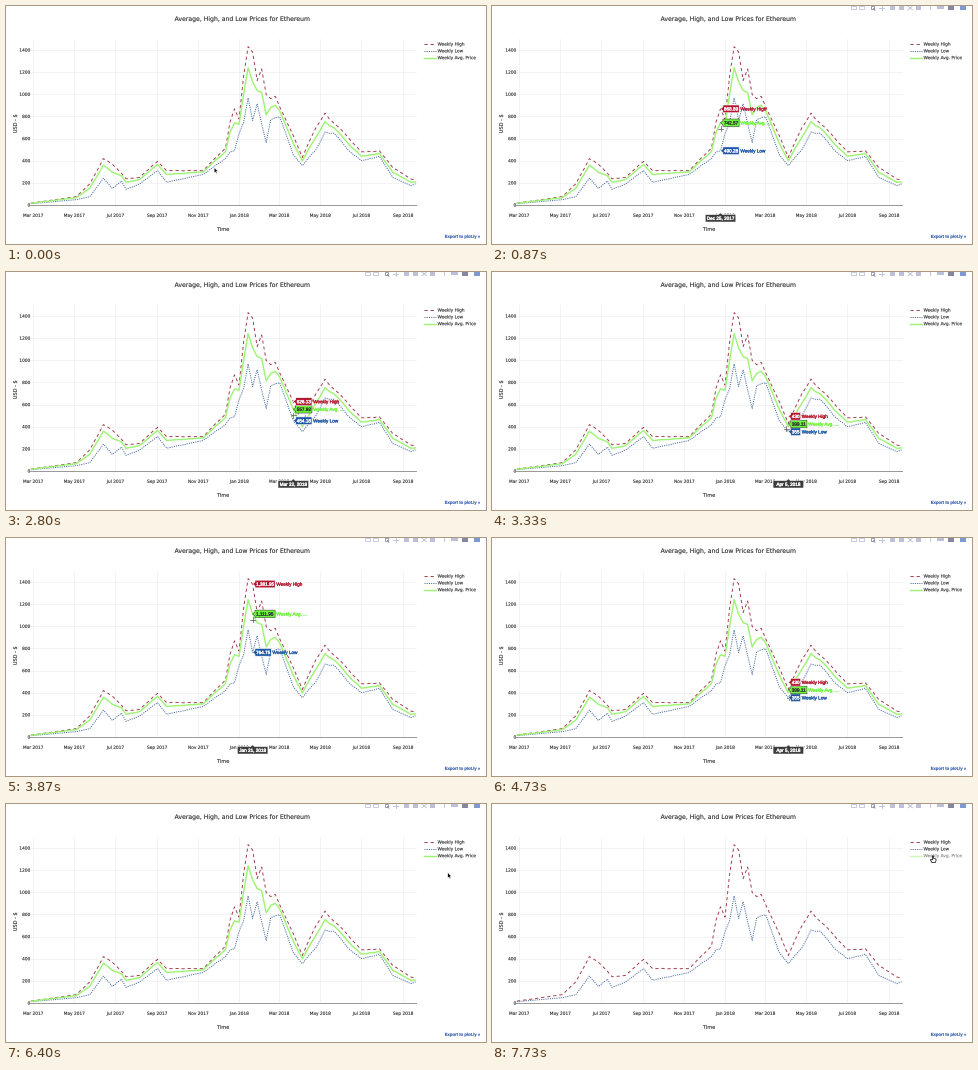
These frames come from a looping animation (480 by 238 pixels, 8 s). A matplotlib script:

```python
import numpy as np
import matplotlib.pyplot as plt
from matplotlib.animation import FuncAnimation
from matplotlib.patches import PathPatch, Polygon, Rectangle
from matplotlib.patheffects import withStroke
from matplotlib.textpath import TextPath
from matplotlib.transforms import Affine2D

plt.rcParams.update({"text.hinting": "none", "lines.scale_dashes": False})
W, H, DPI = 480, 238, 100
PX = 72 / DPI
LOOP, STEP = 8000, 50
RED, BLUE, LIME, INK = "#b5162f", "#1f57a4", "#6cf53a", "#2a2a2a"
RED_LINE, BLUE_LINE, LIME_LINE, GRID = "#a03a4c", "#44689f", "#9cf472", "#f1f1f1"
DASH, DOT = (3.2, 2.9), (1.1, 1.1)
SANS, HOVER_FONT, HOVER_SIZE = "DejaVu Sans", "Liberation Sans", 4.65
MONTHS = "Jan Feb Mar Apr May Jun Jul Aug Sep Oct Nov Dec".split()
START = np.datetime64("2017-03-01")

fig = plt.figure(figsize=(W / DPI, H / DPI), dpi=DPI, facecolor="white")
ax = fig.add_axes([0, 0, 1, 1])
ax.set(xlim=(0, W), ylim=(H, 0))
ax.axis("off")


def day_x(day):
    return 27 + 0.674 * day


def price_y(price):
    return 199 - 0.1107 * price


def ease(t, start, end):
    u = np.clip((t - start) / (end - start), 0, 1)
    return u * u * (3 - 2 * u)


def label(x, y, s, size=4.3, color=INK, align=0.5, turn=0, family=SANS, weight="normal"):
    """Fixed text as outlines; align 0 is left, 1 is right."""
    path = TextPath((0, 0), s, size=size, prop={"family": family, "weight": weight})
    shift = -align * path.get_extents().x1
    move = Affine2D().translate(shift, -0.36 * size).scale(1, -1).rotate_deg(turn)
    return ax.add_patch(PathPatch(path, fc=color, ec=color, lw=0.12 * PX,
                                  transform=move.translate(x, y) + ax.transData))


def line(x, y, color, width, dash=None, **kw):
    style = (0, [d * PX for d in dash]) if dash else "-"
    return ax.plot(x, y, color=color, lw=width * PX, ls=style,
                   dash_capstyle="butt", **kw)[0]


# Prices: turning points (week, high, low), and weeks read exactly (week, high, avg, low)
TURNS = [(0, 17, 12), (10, 75, 48), (13, 190, 75), (16, 415, 240), (18, 370, 150),
         (20, 285, 215), (21, 235, 140), (24, 250, 190), (28, 395, 310), (30, 310, 205),
         (38, 310, 275), (43, 515, 420), (44, 750, 480), (46, 780, 650), (47, 1150, 735),
         (48, 1420, 960), (50, 1120, 910), (51, 1240, 740), (52, 990, 560),
         (53, 960, 770), (55, 890, 800), (60, 430, 355), (63, 700, 500), (65, 825, 655),
         (67, 740, 650), (73, 480, 400), (77, 490, 440), (80, 340, 250), (84, 235, 175),
         (85, 225, 190)]
READ = np.array([(45, 868.89, 742.57, 490.28), (49, 1381.95, 1111.95, 764.75),
                 (54, 981.46, 901.13, 787.97), (58, 626.13, 557.92, 454.18),
                 (70, 616, 560.29, 501.68)])
week = np.arange(86)
days = 299 + 6.71 * (week - 45)
xs = day_x(days)
known = READ[:, 0].astype(int)
keys = np.array(sorted(TURNS + [(w, h, l) for w, h, _, l in READ]))
jitter = 1 + np.random.default_rng(4).uniform(-0.01, 0.01, week.size)
jitter[known] = 1
high, low = (np.interp(week, keys[:, 0], keys[:, k]) * jitter for k in (1, 2))
blend = (READ[:, 2] - READ[:, 3]) / (READ[:, 1] - READ[:, 3])
avg = low + np.interp(week, known, blend) * (high - low)

# Axes, titles and traces
for price in range(0, 1401, 200):
    y = price_y(price)
    if price:
        line([24, 410], [y, y], GRID, 0.8, zorder=1)
    label(24, y, str(price), align=1)
for k in range(10):
    month = np.datetime64("2017-03") + 2 * k
    x = day_x((month.astype("datetime64[D]") - START).astype(int))
    line([x, x], [33, 199], GRID, 0.8, zorder=1)
    year, m = str(month).split("-")
    label(x, 209.3, f"{MONTHS[int(m) - 1]} {year}")
line([24, 410], [199, 199], "#9a9a9a", 1, zorder=1.5)
label(236, 12.7, "Average, High, and Low Prices for Ethereum", 6.15)
label(217, 223, "Time", 5)
label(9, 118, "USD - $", 5, turn=-90)
label(474, 230.3, "Export to plot.ly »", 4.2, "#2a55a8", 1, 0, HOVER_FONT, "bold")

traces = []
for k, (name, prices, color, width, dash) in enumerate([
        ("Weekly High", high, RED_LINE, 0.95, DASH),
        ("Weekly Low", low, BLUE_LINE, 0.95, DOT),
        ("Weekly Avg. Price", avg, LIME_LINE, 1.4, None)]):
    y = 38 + 6.8 * k
    traces.append((line(xs, price_y(prices), color, width, dash, zorder=3),
                   line([418, 430], [y, y], color, width, dash),
                   label(431.5, y, name, 4.35, align=0)))
avg_parts = traces[2]

# Toolbar, cut by the top edge
PALE, STRONG = "#bcc0d8", "#8487a0"
tools = [ax.add_patch(Rectangle((x - w / 2, 0), w, h, fc=color, lw=0))
         for x, w, h, color in [(400, 5, 4, PALE), (409, 5, 4, PALE), (426.5, 4.5, 3.5, PALE),
                                (448.5, 7, 3, PALE), (458.5, 6, 3.6, STRONG),
                                (471, 6, 4, "#7f9ad2")]]
tools += [ax.add_patch(Rectangle((x - w / 2, 0), w, 3, fc="none", ec=color, lw=0.8 * PX))
          for x, w, color in [(361.5, 5, PALE), (369.5, 5, PALE), (380, 3, STRONG)]]
tools += [line(x, y, color, 0.9) for x, y, color in [
    ([381.5, 383], [2.5, 4.2], STRONG), ([387, 392], [1.5, 1.5], PALE),
    ([389.5, 389.5], [0, 4], PALE), ([416, 420.5], [0, 3.8], PALE),
    ([420.5, 416], [0, 3.8], PALE), ([438, 438], [0, 3], PALE)]]


# Hover labels
def hover_text(color, ha="left"):
    return ax.text(0, 0, "", fontsize=HOVER_SIZE * PX, color=color, ha=ha,
                   va="baseline", family=HOVER_FONT, zorder=9,
                   path_effects=[withStroke(linewidth=0.2, foreground=color)])


def hover_box(color, edge):
    return ax.add_patch(Polygon([(0, 0)], fc=color, ec=edge, lw=0.5 * PX, zorder=8))


class Tag:
    def __init__(self, name, prices, color, ink, edge):
        self.prices = prices
        self.box, self.value = hover_box(color, edge), hover_text(ink)
        self.name = hover_text(color)
        self.name.set_text(name)
        self.parts = [self.box, self.value, self.name]

    def place(self, i, x, y):
        s = f"{self.prices[i]:,.2f}".removesuffix(".00")
        digits = sum(c.isdigit() for c in s)
        width = HOVER_SIZE * (0.556 * digits + 0.278 * (len(s) - digits))
        a, b = x + 2.4, x + 4.4 + width
        self.box.set_xy([(x, y), (a, y - 2), (a, y - 3.8), (b, y - 3.8),
                         (b, y + 3.8), (a, y + 3.8), (a, y + 2)])
        self.value.set(text=s, position=(a + 1, y + 1.7))
        self.name.set_position((b + 1.2, y + 1.7))


tags = [Tag("Weekly Low", low, BLUE, "white", "white"),
        Tag("Weekly Avg. ...", avg, LIME, "#333333", "#333333"),
        Tag("Weekly High", high, RED, "white", "white")]
date_box, date_text = hover_box("#3c3c3c", "white"), hover_text("white", "center")
hover = [p for tag in tags for p in tag.parts] + [date_box, date_text]


def place_hover(i):
    x, bound = xs[i], H
    for tag in tags:
        bound = min(price_y(tag.prices[i]), bound - 7.7)
        tag.place(i, x, bound)
    year, month, day = str(START + int(round(days[i]))).split("-")
    date_text.set(text=f"{MONTHS[int(month) - 1]} {int(day)}, {year}",
                  position=(x, 213.9))
    date_box.set_xy([(x, 206.8), (x + 2, 208.6), (x + 15.3, 208.6), (x + 15.3, 216),
                     (x - 15.3, 216), (x - 15.3, 208.6), (x - 2, 208.6)])


# Mouse: sweeps along the average line (start, end, week), then off to the legend
SWEEPS = [(70, 330, 16), (330, 840, 45), (930, 1130, 41), (1130, 1730, 54),
          (2050, 2250, 52), (2250, 2600, 57), (2660, 2730, 59), (2740, 2790, 58),
          (3000, 3230, 60), (3230, 3800, 49), (4470, 4850, 66), (4850, 5070, 58),
          (5330, 5440, 70), (5500, 5780, 84)]
EXIT, LEGEND = np.array((442, 72)), np.array((441, 55))
LEAVE, CLICK = 5780, 7650

ARROW = np.array([(0, 0), (0, 5.2), (1.2, 4.2), (2, 6), (2.9, 5.6), (2.1, 3.8), (3.7, 3.7)])
HAND = np.array([(-0.6, -3), (0.5, -3), (0.6, -0.6), (3, 0), (3, 2), (2.2, 3.6),
                 (-1, 3.6), (-2.6, 1), (-2, 0.3), (-0.6, 1)])
arrow = ax.add_patch(Polygon(ARROW, fc="black", ec="white", lw=0.4 * PX, zorder=12))
hand = ax.add_patch(Polygon(HAND, fc="white", ec="black", lw=0.7 * PX, zorder=12))
cross = [line([], [], "#555555", 0.7, zorder=7) for _ in range(2)]


def mouse(t):
    w = 40.5
    for start, end, goal in SWEEPS:
        w += (goal - w) * ease(t, start, end)
    pos = np.array([np.interp(w, week, xs), price_y(np.interp(w, week, avg)) + 6])
    pos = pos + (EXIT - pos) * ease(t, LEAVE, 6000)
    return w, pos + (LEGEND - pos) * ease(t, 6270, 6730)


def draw(frame):
    t = frame * STEP
    w, (x, y) = mouse(t)
    over = 70 < t < LEAVE
    if over:
        place_hover(int(round(w)))
    for part in hover + cross:
        part.set_visible(over)
    cross[0].set_data([x - 2.5, x + 2.5], [y, y])
    cross[1].set_data([x, x], [y - 2.5, y + 2.5])

    on_legend = t > LEAVE and y < 60
    arrow.set_xy(ARROW + (x, y))
    hand.set_xy(HAND + (x, y))
    arrow.set_visible(not over and not on_legend)
    hand.set_visible(on_legend)

    for part in tools:
        part.set_alpha(np.clip((t - 100) / 300, 0, 1))
    for part in avg_parts:
        part.set_alpha(0.5 if t >= CLICK else 1)
    avg_parts[0].set_visible(t <= CLICK)
    return []


anim = FuncAnimation(fig, draw, frames=LOOP // STEP, interval=STEP,
                     init_func=lambda: draw(0), repeat=True, repeat_delay=0, blit=False)
plt.show()
```
